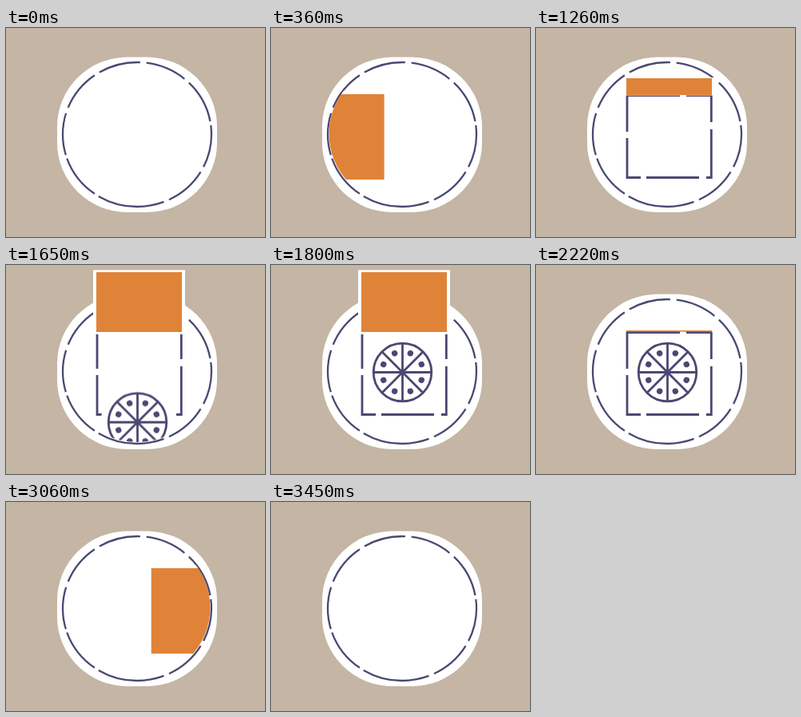
These frames come from a looping animation (324 px wide and 262 px high, 3600 ms). An HTML page:

```html
<!DOCTYPE html>
<html lang="en">
<head>
<meta charset="utf-8">
<title>Pizza box</title>
<style>
  html, body { margin: 0; width: 100%; height: 100%; overflow: hidden; background: #c4b5a4; }
  svg { display: block; width: 324px; height: 262px; }
  .line { fill: none; stroke: #4b4872; }
  .slide, .lid, .pizza { animation: 3600ms linear infinite; }
  .slide { animation-name: slide; }
  .lid { animation-name: lid; transform-origin: 0 83.6px; }
  .pizza { animation-name: rise; }

  @keyframes slide {
    0% { transform: translateX(-148px); animation-timing-function: cubic-bezier(.37, 0, .63, 1); }
    20.8333% { transform: none; }
    75% { transform: translateX(0); animation-timing-function: cubic-bezier(.37, 0, .63, 1); }
    95.8333%, 100% { transform: translateX(146px); }
  }
  @keyframes lid {
    0%, 29.1667% { transform: scaleY(1); }
    37.5%, 58.3333% { transform: scaleY(-.7); }
    66.6667%, 100% { transform: scaleY(1); }
  }
  @keyframes rise {
    0%, 41.6667% { transform: translateY(126px); }
    50%, 100% { transform: translateY(0); }
  }
</style>
</head>
<body>
<svg viewBox="0 0 324 262">
  <defs>
    <!-- Inside of the plate, plus the space the open lid needs above it -->
    <clipPath id="window">
      <ellipse cx="164" cy="132.5" rx="91.5" ry="89.5"/>
      <rect x="105" y="0" width="124" height="88"/>
    </clipPath>
  </defs>

  <rect width="324" height="262" fill="#c4b5a4"/>
  <rect x="64" y="36.5" width="200" height="194.5" rx="88" ry="87" fill="#fff"/>
  <ellipse class="line" cx="164" cy="133.5" rx="93" ry="90.5" stroke-width="2.3" pathLength="360"
    stroke-dasharray="26.4 4.5 33.3 4.4 53 3.6 35.6 2.8 33.4 4.6 33.2 4.4 33.3 4.9 32.6 4.6 35 3.1 7.3 0"/>

  <g clip-path="url(#window)">
    <g class="slide">
      <path class="line" stroke-width="2.8"
        d="M114 130V84.5H180M188 84.5H219.3V118M219.3 127V187.5H213M204 187.5H138M131 187.5H114V138"/>
      <g class="pizza">
        <circle cx="164.5" cy="134.5" r="46" fill="#fff"/>
        <g class="line" stroke-width="2.8">
          <circle cx="164.5" cy="134.5" r="36.3"/>
          <path d="M164.5 98V171M128 134.5H201M138.8 108.8L190.2 160.2M138.8 160.2L190.2 108.8"/>
          <circle cx="164.5" cy="134.5" r="25.7" stroke-width="7.4" stroke-linecap="round"
            pathLength="360" stroke-dasharray=".01 44.99" stroke-dashoffset="-22.5"/>
        </g>
      </g>
      <g class="lid">
        <rect x="109" y="79" width="115" height="115" fill="#fff"/>
        <rect x="113" y="83" width="107" height="107" fill="#df8338"/>
      </g>
    </g>
  </g>
</svg>
</body>
</html>
```
